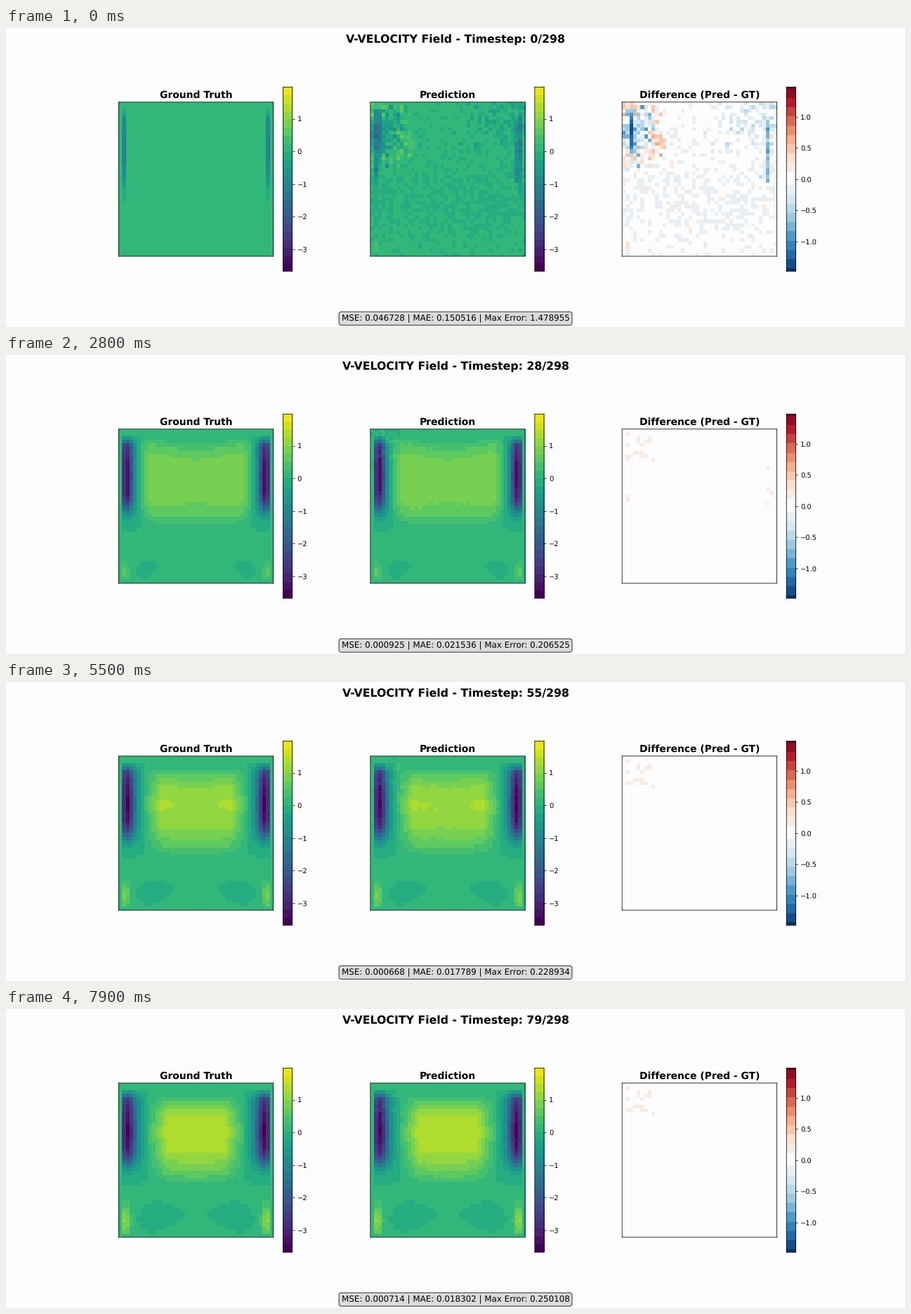
Recreate the animation shown at these times as a matplotlib script. Size 1280x427 px, loop 8000 ms.

```python
import numpy as np
import matplotlib
import matplotlib.pyplot as plt
from matplotlib.animation import FuncAnimation

W, H, DPI = 1280, 427, 64
PT = 10 / 9          # point size factor for this dpi
N, FRAMES = 42, 80
VMIN, VMAX, DMAX = -3.68, 1.974, 1.479
BG = "#fdfdfd"

plt.rcParams.update({"font.family": "DejaVu Sans", "text.hinting": "none"})
viridis = matplotlib.colormaps["viridis"]
rdbu = matplotlib.colormaps["RdBu_r"]

R, C = np.mgrid[0:N, 0:N].astype(float)
M = np.minimum(C, N - 1 - C)         # distance to the nearer side wall

# Readings at a few timesteps: MSE, MAE, max error
STAT_T = [0, 7, 18, 28, 45, 65, 79]
MSE = [.046728, .002517, .001276, .000925, .000680, .000657, .000714]
MAE = [.150516, .034802, .025360, .021536, .018270, .017361, .018302]
TOP = [1.478955, .305632, .267450, .206525, .208897, .248890, .250108]


def stat(values, t):
    return np.exp(np.interp(np.sqrt(t), np.sqrt(STAT_T), np.log(values)))


def fade(t, tau):
    return np.exp(-t / tau)


def bump(x, y, w, h):
    return np.exp(-((C - x) / w) ** 2 - ((R - y) / h) ** 2)


def jets(t, s):
    """Downward flow along both walls, spreading inwards."""
    width = (.5 + 2.2 * s) * (1 + .12 * np.maximum(R - 21, 0))
    fall = np.exp(-(np.maximum(M - 2, 0) / width) ** 1.5) - .04
    v = 3.65 * (1 - fade(t, 7)) * np.maximum(fall, 0)
    v[M == 1] = 1.05 + 1.9 * (1 - fade(t, 3))
    v *= np.clip((R - 1) / 3, 0, 1) / (1 + np.exp((R - 22) / 1.3))
    return v * np.clip(1 - .3 * ((R - 13) / 10) ** 2, .4, 1)


def core(t, s):
    """Upward return flow: two lobes that merge into one block."""
    x = np.maximum(M - 5, 0)
    side = np.exp(-x / 6)
    lobe, mid = 1.44 * s ** .75, 1.44 * s ** 1.1
    ramp = .245 * (M - 2 - 6.1 * s + 1.1)
    plateau = lobe - (lobe - mid) * x / 15.5
    up = max(3, 10.5 - 12 * fade(t, 9)) + 13 * fade(t, 22) * side
    down = 15.5 - 15 * fade(t, 11) + (9.6 * fade(t, 12) - 3) * side
    dy = R - 12.9
    above = (-dy / up).clip(0) ** (2 + 7.2 * fade(t, 12))
    below = (dy / down).clip(0) ** (1.8 + 16.5 * fade(t, 10))
    v = np.minimum(ramp, plateau).clip(0) * np.clip(1 - above - below, 0, 1)
    return v * (R >= 3)


def corners(s):
    """Rising flow in the bottom corners and weak eddies beside it."""
    rise = 1.05 * s ** .95 * np.exp(-((M - 1.3) / (.2 + 1.2 * s)) ** 2
                                    - ((R - 40.3 + 3.3 * s) / (.1 + 4.4 * s)) ** 2)
    dx = (M - 2 - 9.3 * s) / max(.1, 9.6 * s - 2.6)
    dy = (R - 40.3 + 4.6 * s + .8 * dx) / (.05 + 4.1 * s)
    dy /= np.clip(1 - .5 * dx, .3, 1.5)
    return rise - .1 * np.clip(1 - dx ** 2 - dy ** 2, 0, 1)


def velocity(t):
    s = np.sqrt(t / (FRAMES - 1))
    v = core(t, s) - jets(t, s) + corners(s)
    v[(M == 0) | (R == N - 1)] = 0
    return v


rng = np.random.default_rng(4)


def rand(lo=0.0, hi=1.0):
    return rng.uniform(lo, hi, (N, N))


def box(c0, c1, r0, r1):
    return (C >= c0) & (C <= c1) & (R >= r0) & (R <= r1)


def first_error():
    # faint negative drift, denser in the lower half
    density = .22 + .38 * np.exp(-((R - 26) / 8) ** 2)
    e = np.where(rand() < density, -rand(.07, .2), 0)
    e = np.where(rand() < .03, rand(.1, .2), e)
    # upper right patch
    e = np.where(rand() < .6 * bump(36, 4, 9, 7), -rand(.12, .5), e)
    # warm ring around a cold patch at the upper left
    d = np.hypot(C - 1.5, R - 8.5)
    e = np.where((d > 5) & (d < 10.5) & (rand() < .45), rand(.12, .6), e)
    e = np.where(rand() < 1.2 * bump(2, 8, 4, 5), -rand(.2, .9), e)
    # narrow strips beside the walls
    e = np.where(box(2, 2, 3, 22), -1.45 * np.exp(-((R - 8) / 7.5) ** 2), e)
    e = np.where(box(39, 39, 5, 21), -rand(.6, .95), e)
    return np.where(box(1, 1, 38, 40), rand(.2, .4), e)


START = first_error()
WALL = rand(0, .25) * (M >= 1) * (M <= 2) * (R >= 8) * (R <= 22)
NEAR = rng.normal(0, .11, (N, N)) * box(0, 9, 0, 10)
SPECKS = .15 * (rand() < .05) * box(8, 30, 5, 17)
LASTING = rand(.115, .24) * (rand() < .25) * box(1, 8, 1, 9)
GRAIN = rng.normal(0, .03, (N, N))


def error(t, v):
    e = START * fade(t, 1.6)
    e = e + WALL * (.3 + .75 * fade(t, 22))
    e = e + (NEAR + SPECKS) * 1.4 * fade(t, 18) * min(1, t / 3)
    e = e + LASTING * min(1, t / 30)
    return e + GRAIN * (v > .1) * min(1, t / 3) / (1 + t / 25)


def shade_v(v):
    k = np.clip(np.floor((v + .017) / .245), -16, 7)
    return viridis(np.clip(.662 + .044 * k, 0, 1))[..., :3]


def shade_d(d):
    n = np.floor((np.abs(d) + .04) / .148)
    rgb = rdbu(np.clip(.5 + .5 * (n / 10) ** 1.1 * np.sign(d), 0, 1))[..., :3]
    rgb[n == 0] = 253 / 255
    return rgb


fig = plt.figure(figsize=(W / DPI, H / DPI), dpi=DPI, facecolor=BG)


def axes_px(x, y, w, h):
    ax = fig.add_axes([x / W, 1 - (y + h) / H, w / W, h / H])
    for spine in ax.spines.values():
        spine.set(linewidth=.8 * PT, snap=False)
    return ax


def panel(x, title):
    ax = axes_px(x, 105.8, 220.2, 220.2)
    ax.set_xticks([])
    ax.set_yticks([])
    ax.set_title(title, fontsize=14 * PT, fontweight="bold", pad=6 * PT)
    return ax.imshow(np.ones((N, N, 3)), interpolation="nearest", aspect="auto")


def colorbar(x, lo, hi, ticks, labels, shade):
    ax = axes_px(x, 84.3, 13.2, 263.2)
    pad = (hi - lo) / 100       # bleed, so the fill reaches the frame
    strip = shade(np.linspace(hi + pad, lo - pad, 540)[:, None])
    ax.imshow(strip, extent=(-.1, 1.1, lo - pad, hi + pad), aspect="auto",
              interpolation="nearest")
    ax.set(xlim=(0, 1), ylim=(lo, hi), xticks=[])
    ax.yaxis.tick_right()
    ax.set_yticks(ticks, [s.replace("-", "\u2212") for s in labels])
    ax.tick_params(axis="y", labelsize=10 * PT, length=3.5 * PT,
                   width=.8 * PT, pad=3.5 * PT)


truth = panel(160.4, "Ground Truth")
guess = panel(518.8, "Prediction")
diff = panel(877.2, "Difference (Pred - GT)")

whole = range(-3, 2)
halves = np.arange(-2, 3) / 2
for bar_x in (394.4, 752.8):
    colorbar(bar_x, VMIN, VMAX, whole, [str(n) for n in whole], shade_v)
colorbar(1111.2, -DMAX, DMAX, halves, [f"{n:.1f}" for n in halves], shade_d)

heading = fig.text(.5, .98, "", ha="center", va="top",
                   fontsize=16 * PT, fontweight="bold")
note = fig.text(.5, 1 - 414.8 / H, "", ha="center", va="center", fontsize=12 * PT,
                bbox=dict(boxstyle="round", facecolor="lightgray", alpha=.8,
                          linewidth=PT))


def draw(t):
    v = velocity(t)
    e = error(t, v)
    truth.set_data(shade_v(v))
    guess.set_data(shade_v(v + e))
    diff.set_data(shade_d(e))
    heading.set_text(f"V-VELOCITY Field - Timestep: {t}/298")
    note.set_text(f"MSE: {stat(MSE, t):.6f} | MAE: {stat(MAE, t):.6f}"
                  f" | Max Error: {stat(TOP, t):.6f}")
    return truth, guess, diff, heading, note


anim = FuncAnimation(fig, draw, frames=FRAMES, interval=100,
                     repeat=True, repeat_delay=0, blit=False)
plt.show()
```
